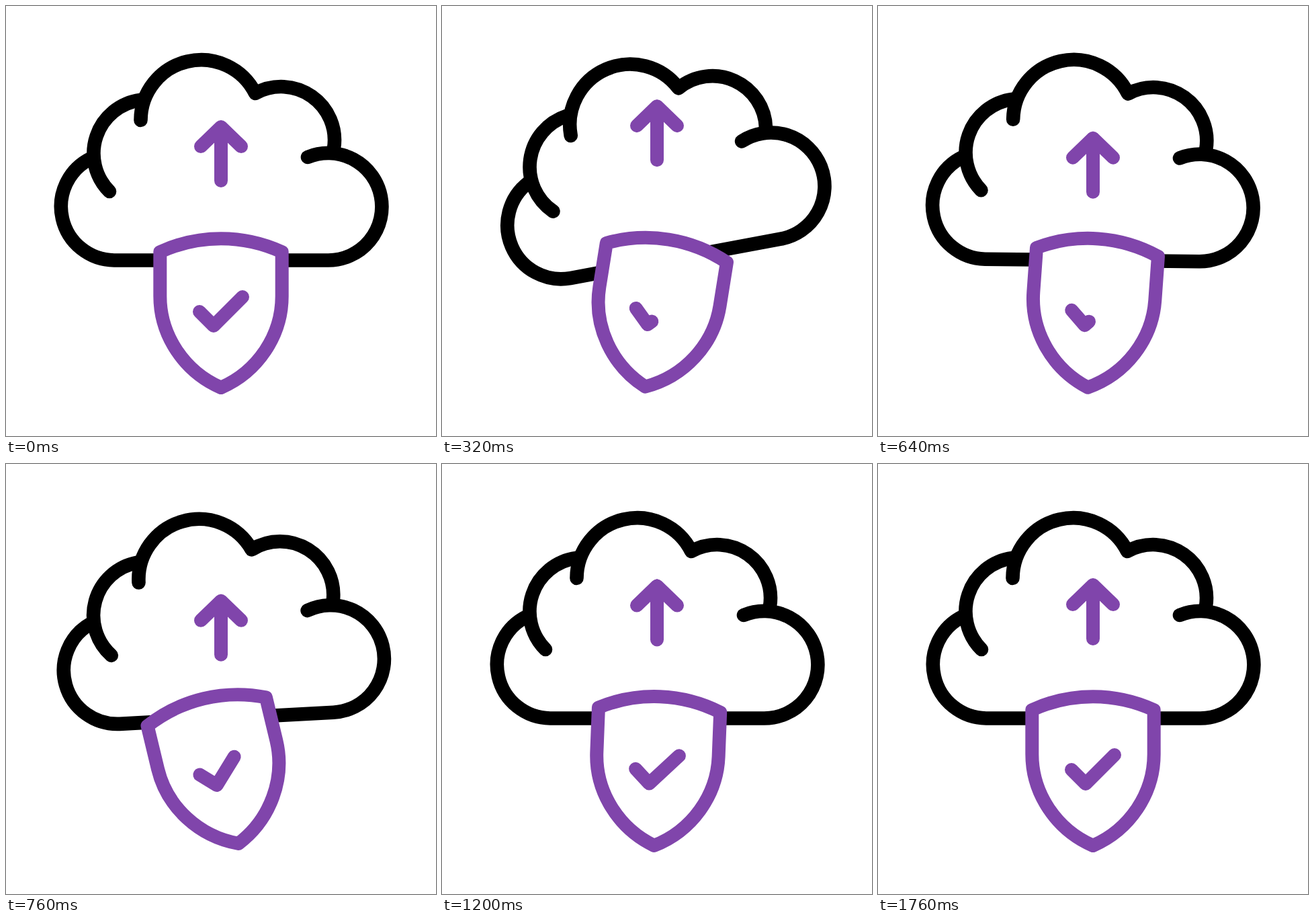
These frames come from a looping animation (640 px wide and 640 px high, 1800 ms). An HTML page:

```html
<!DOCTYPE html>
<html lang="en">
<head>
<meta charset="utf-8">
<title>Secure cloud upload</title>
<style>
  html, body { margin: 0; width: 100%; height: 100%; overflow: hidden; background: #fff; }
  svg { display: block; width: 100vw; height: 100vh; }
  path { fill: none; stroke-linecap: round; stroke-linejoin: round; }
  #cloud { stroke: #000; stroke-width: 20.6; }
  #arrow, #shield { stroke: #8045ab; stroke-width: 20; }
  #plate { fill: #fff; }
</style>
</head>
<body>
<svg viewBox="0 0 640 640">
  <g id="cloud">
    <path d="M126 227A80 80 0 0 0 161 378.5H479.5A79.8 79.8 0 1 0 449 225"/>
    <path d="M200 140A80 80 0 0 0 154 276"/>
    <path d="M200.5 170A90 90 0 0 1 371 130A79.5 79.5 0 0 1 488 212"/>
  </g>
  <g id="arrow">
    <path d="M320 180V260M290 209L320 180L350 209"/>
  </g>
  <g id="shield">
    <path id="plate" d="M229.3 366A217 217 0 0 1 410.7 366V432C410.7 490 375 544 320 568C265 544 229.3 490 229.3 432Z"/>
    <path id="check" d="M288 455L309 476L352 433"/>
  </g>
</svg>
<script>
  const LOOP = 1800;
  const [cloud, arrow, shield, check] =
    ['cloud', 'arrow', 'shield', 'check'].map(id => document.getElementById(id));
  const checkLength = check.getTotalLength();

  const smooth = p => p * p * (3 - 2 * p);

  // Eases from rest through evenly spaced, dying peaks and back to rest
  function swing(t, start, step, ...peaks) {
    const phase = Math.max(0, (t - start) / step);
    const i = Math.floor(phase);
    const from = peaks[i - 1] || 0;
    const to = peaks[i] || 0;
    return from + (to - from) * smooth(phase - i);
  }

  function render(t) {
    const cloudTurn = swing(t, 43, 236, -12, 5.2, -3.1);
    const arrowShift = swing(t, 150, 280, -46.5, 28, -20, 5.4);
    const shieldTurn = swing(t, 213, 277.4, 27, -13.6, 7.4, -1.3);
    cloud.setAttribute('transform', `rotate(${cloudTurn} 320 229)`);
    arrow.setAttribute('transform', `translate(0 ${arrowShift})`);
    shield.setAttribute('transform', `rotate(${shieldTurn} 320 457)`);

    // The tick is wiped away until 480 ms, then drawn again
    const drawn = smooth(Math.min(1, Math.abs(t - 480) / 360));
    check.style.visibility = drawn > 0.002 ? 'visible' : 'hidden';
    check.style.strokeDasharray = drawn < 1 ? `${drawn * checkLength} ${checkLength * 2}` : 'none';
  }

  const start = performance.now();
  function tick(now) {
    render(Math.max(0, now - start) % LOOP);
    requestAnimationFrame(tick);
  }
  render(0);
  requestAnimationFrame(tick);
</script>
</body>
</html>
```
